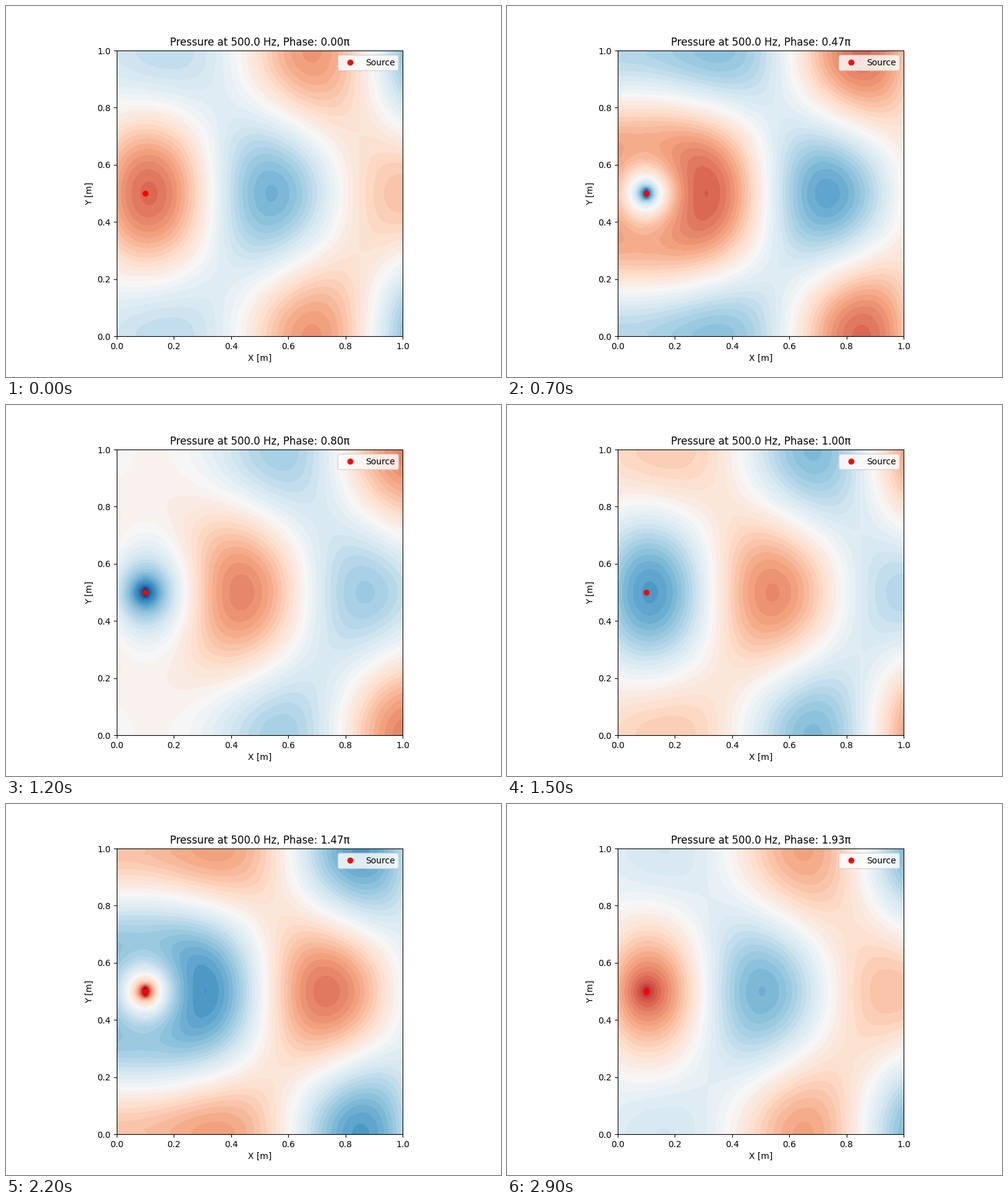
Write a matplotlib script that moves like this. It is 800 by 600 pixels and loops after 3 s.

```python
import numpy as np
import matplotlib.pyplot as plt
from matplotlib.animation import FuncAnimation

FRAMES = 30
FREQ = 500.0
SPEED = 348.0
SRC_X, SRC_Y = 0.1, 0.5
PEAK = 0.345       # amplitude mapped to the ends of the colour scale
SPREAD = 0.006     # softens the point source
MODES = 24

k = 2 * np.pi * FREQ / SPEED
axis = np.linspace(0, 1, 121)
X, Y = np.meshgrid(axis, axis)


def duct_mode(m):
    """Cross mode of a rigid-walled duct: open on the left, impedance end at x = 1."""
    ky = 2 * np.pi * m
    kx = np.conj(np.sqrt(complex(k**2 - ky**2)))
    reflect = (kx - k) / (kx + k)
    direct = np.exp(-1j * kx * np.abs(X - SRC_X))
    echo = reflect * np.exp(-1j * kx * (2 - X - SRC_X))
    weight = (2 if m else 1) * np.exp(-0.5 * (ky * SPREAD)**2)
    shape = np.cos(ky * SRC_Y) * np.cos(ky * Y)
    return weight * shape * (direct + echo) / (2j * kx)


pressure = 1j * sum(duct_mode(m) for m in range(MODES)) / PEAK
levels = np.linspace(-1, 1, 50)

fig, ax = plt.subplots(figsize=(8, 6), dpi=100)


def draw(i):
    phase = 2 * np.pi * i / FRAMES
    field = np.clip(np.real(pressure * np.exp(1j * phase)), -0.999, 0.999)
    ax.clear()
    ax.contourf(X, Y, field, levels=levels, cmap="RdBu_r", vmin=-1, vmax=1)
    ax.plot(SRC_X, SRC_Y, "ro", label="Source")
    ax.set_xlim(0, 1)
    ax.set_ylim(0, 1)
    ax.set_aspect("equal")
    ax.set_xlabel("X [m]")
    ax.set_ylabel("Y [m]")
    ax.set_title(f"Pressure at {FREQ} Hz, Phase: {phase / np.pi:.2f}π")
    ax.legend(loc="upper right")
    return []


anim = FuncAnimation(fig, draw, frames=FRAMES, init_func=lambda: draw(0),
                     interval=100, repeat=True, repeat_delay=0, blit=False)
plt.show()
```
